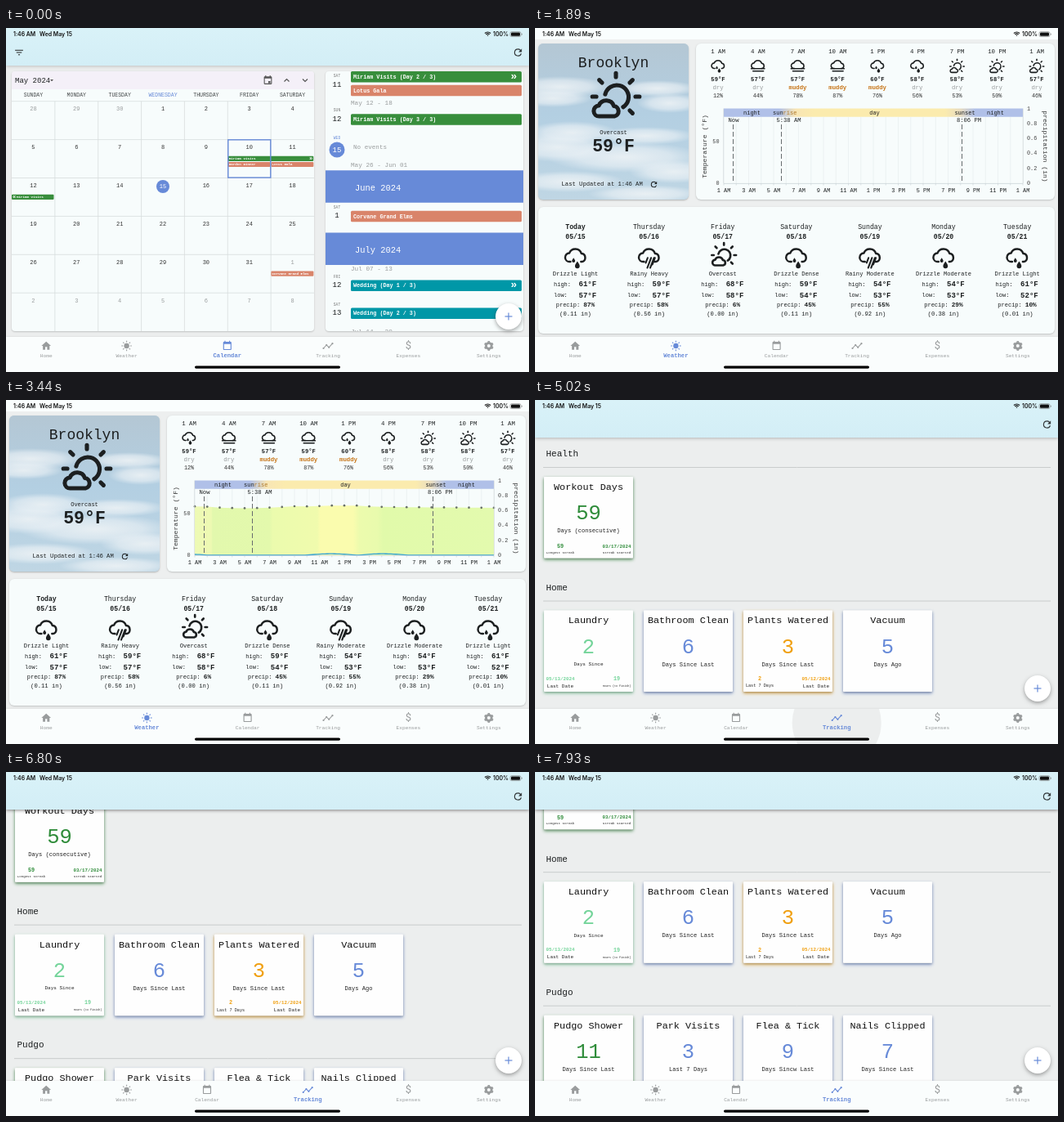
Write an HTML page with a canvas that moves like this. It is 640 by 421 pixels and loops after 8000 ms.

```html
<!DOCTYPE html>
<html lang="en">
<head>
<meta charset="utf-8">
<title>Household planner</title>
<style>
html, body { margin: 0; width: 100%; height: 100%; overflow: hidden; background: #eceeee; }
canvas { display: block; width: 640px; height: 421px; }
</style>
</head>
<body>
<canvas id="stage"></canvas>
<script>
const W = 640, H = 421, LOOP = 8000;
const canvas = document.getElementById('stage');
const c = canvas.getContext('2d');
const dpr = window.devicePixelRatio || 1;
canvas.width = W * dpr;
canvas.height = H * dpr;

const MONO = '"Liberation Mono", monospace';
const BLUE = '#678ad8', GREEN = '#388e3c', ORANGE = '#d9846a', TEAL = '#0097a7';
const INK = '#1c1f20', GRAY = '#999c9d', PAGE = '#eceeee', CARD = '#f7fcfc';

const ICONS = {
  home: 'M10 20v-6h4v6h5v-8h3L12 3 2 12h3v8z',
  calendar: 'M19 3h-1V1h-2v2H8V1H6v2H5c-1.1 0-2 .9-2 2v14c0 1.1.9 2 2 2h14c1.1 0 2-.9 2-2V5c0-1.1-.9-2-2-2zm0 16H5V8h14z',
  refresh: 'M17.65 6.35C16.2 4.9 14.2 4 12 4a8 8 0 1 0 7.73 10h-2.08A6 6 0 1 1 12 6c1.66 0 3.14.69 4.22 1.78L13 11h7V4z',
  filter: 'M10 18h4v-2h-4zM3 6v2h18V6zm3 7h12v-2H6z',
  cloud: 'M7.5 16h-.7a3.9 3.9 0 0 1-.3-7.8A5.8 5.8 0 0 1 17.4 8.6a3.75 3.75 0 0 1 .4 7.4H17',
  closed: 'M6.8 16a3.9 3.9 0 0 1-.3-7.8A5.8 5.8 0 0 1 17.4 8.6a3.75 3.75 0 0 1 .4 7.4z',
  drop: 'M0-2.6C1 -1 1.7-.2 1.7.8a1.7 1.7 0 0 1-3.4 0C-1.7-.2-1-1 0-2.6z'
};
for (const k in ICONS) ICONS[k] = new Path2D(ICONS[k]);

// The picture advances in held steps: [first, last, count].
const STEPS = [[0, 0, 1], [500, 1070, 6], [1270, 1270, 1], [1470, 1570, 2], [1770, 1770, 1],
  [1890, 1890, 1], [2010, 2570, 6], [2670, 3440, 8], [4630, 4630, 1], [4790, 5020, 3],
  [5760, 5760, 1], [6250, 7010, 8], [7110, 7210, 2], [7630, 7930, 4]];
const ticks = STEPS.flatMap(([a, b, n]) =>
  Array.from({ length: n }, (_, i) => n > 1 ? a + (b - a) * i / (n - 1) : a));
const held = t => ticks.filter(k => k <= t).pop();

const clamp = x => Math.max(0, Math.min(1, x));
const ease = x => (1 - Math.cos(Math.PI * clamp(x))) / 2;

function along(points, t) {
  for (let i = 1; i < points.length; i++) {
    const [t0, v0] = points[i - 1], [t1, v1] = points[i];
    if (t <= t1) return v0 + (v1 - v0) * clamp((t - t0) / (t1 - t0));
  }
  return points[points.length - 1][1];
}

function text(s, x, y, size, color = INK, bold = false, align = 'center', font = MONO) {
  c.font = `${bold ? 'bold ' : ''}${size}px ${font}`;
  c.fillStyle = color;
  c.textAlign = align;
  c.fillText(s, x, y + size * 0.3);
}
const left = (s, x, y, size, color, bold) => text(s, x, y, size, color, bold, 'left');

function box(x, y, w, h, color, r = 0) {
  c.fillStyle = color;
  c.beginPath();
  c.roundRect(x, y, w, h, r);
  c.fill();
}
function disc(x, y, r, color) {
  c.fillStyle = color;
  c.beginPath();
  c.arc(x, y, r, 0, 7);
  c.fill();
}
function line(pts, color, width = 1, dash = []) {
  c.strokeStyle = color;
  c.lineWidth = width;
  c.setLineDash(dash);
  c.beginPath();
  pts.forEach(([x, y]) => c.lineTo(x, y));
  c.stroke();
  c.setLineDash([]);
}
function shadowed(color, blur, dy, draw) {
  c.save();
  c.shadowColor = color;
  c.shadowBlur = blur * dpr;
  c.shadowOffsetY = dy * dpr;
  draw();
  c.restore();
}
function at(x, y, scale, draw) {
  c.save();
  c.translate(x, y);
  c.scale(scale, scale);
  draw();
  c.restore();
}
const icon = (name, x, y, size, color) => at(x, y, size / 24, () => {
  c.translate(-12, -12);
  c.fillStyle = color;
  c.fill(ICONS[name], 'evenodd');
});
const card = (x, y, w, h, r = 6) =>
  shadowed('rgba(0,0,0,.22)', 2, .8, () => box(x, y, w, h, CARD, r));

function header(depth) {
  const g = c.createLinearGradient(0, 0, 0, 46);
  g.addColorStop(0, '#d9f2f8');
  g.addColorStop(1, '#d3eef6');
  shadowed(`rgba(0,0,0,${depth})`, 4, 1, () => box(0, 0, W, 46, g));
  icon('refresh', 626.5, 30, 14, '#34393b');
}
function addButton() {
  shadowed('rgba(0,0,0,.35)', 5, 2, () => disc(615, 353, 16, '#fff'));
  line([[610.5, 353], [619.5, 353]], BLUE, 1.2);
  line([[615, 348.5], [615, 357.5]], BLUE, 1.2);
}

function monthGrid() {
  const col = 370 / 7, row = 46.9, x0 = 7, y0 = 89.7;
  card(7, 53, 370, 318, 4);
  box(7, 53, 370, 22, '#f4f0f8', [4, 4, 0, 0]);
  left('May 2024', 11, 64, 9);
  c.fillStyle = '#555';
  c.beginPath();
  c.moveTo(54, 63); c.lineTo(58, 63); c.lineTo(56, 65.3);
  c.fill();
  icon('calendar', 320.5, 64, 13, '#555');
  box(321, 65, 2.6, 2.6, '#555');
  line([[340.5, 65.5], [343.5, 62.5], [346.5, 65.5]], '#555', 1.2);
  line([[363, 62.5], [366, 65.5], [369, 62.5]], '#555', 1.2);

  ['SUNDAY', 'MONDAY', 'TUESDAY', 'WEDNESDAY', 'THURSDAY', 'FRIDAY', 'SATURDAY'].forEach((d, i) =>
    text(d, x0 + col * (i + .5), 82, 6.5, i === 3 ? BLUE : '#454849'));
  for (let r = 0; r < 6; r++) line([[7, y0 + row * r], [377, y0 + row * r]], '#d8dddd', .8);
  for (let i = 1; i < 7; i++) line([[x0 + col * i, y0], [x0 + col * i, 371]], '#d8dddd', .8);
  for (let i = 0; i < 42; i++) {
    const day = new Date(2024, 3, 28 + i), today = i === 17;
    const x = x0 + col * (i % 7 + .5), y = y0 + row * Math.floor(i / 7) + 9.5;
    if (today) disc(x, y + 1, 8, BLUE);
    text(day.getDate(), x, y + (today ? 1 : 0), 7, today ? '#fff' : day.getMonth() === 4 ? '#333' : '#9a9d9e');
  }
  const chip = (s, x, y, w, color) => {
    box(x, y, w, 6.2, color, 1);
    left(s, x + 1, y + 3.1, 4.2, '#fff', true);
  };
  chip('Miriam Visits', 271.8, 156.7, 104.5, GREEN);
  text('»', 373, 159.5, 7, '#fff', true);
  chip('Garden Dinner', 271.8, 163.9, 51.6, ORANGE);
  chip('Lotus Gala', 324.4, 163.9, 52, ORANGE);
  chip('  Miriam Visits', 7, 203.7, 51.5, GREEN);
  text('«', 10, 206.5, 7, '#fff', true);
  chip('Corvane Grand Elms', 324.4, 297.5, 52, ORANGE);
  c.strokeStyle = BLUE;
  c.lineWidth = 1.4;
  c.strokeRect(271.8, 136.8, 52, 46.3);
}

function agenda() {
  card(391, 53, 242, 318, 4);
  c.save();
  c.beginPath();
  c.roundRect(391, 53, 242, 318, 4);
  c.clip();
  const day = (name, n, y) => {
    text(name, 405, y, 4.6, '#777');
    text(n, 405, y + 10, 9);
  };
  const bar = (s, y, color, more) => {
    box(422, y, 209, 13.5, color, 1.5);
    left(s, 425, y + 6.8, 6.75, '#fff', true);
    if (more) text('»', 621.5, y + 6, 13, '#fff', true);
  };
  const range = (s, y) => left(s, 422, y, 7.7, GRAY);
  const month = (s, y) => {
    box(391, y, 242, 39.5, BLUE);
    left(s, 427, y + 21.5, 10.4, '#fff');
  };
  day('SAT', 11, 59);
  bar('Miriam Visits (Day 2 / 3)', 53, GREEN, true);
  bar('Lotus Gala', 69.8, ORANGE);
  range('May 12 - 18', 91.5);
  day('SUN', 12, 101);
  bar('Miriam Visits (Day 3 / 3)', 105.3, GREEN);
  text('WED', 405, 135, 4.6, BLUE);
  disc(405, 149, 9.5, BLUE);
  text(15, 405, 149, 9, '#fff');
  left('No events', 425, 145.5, 7.6, GRAY);
  range('May 26 - Jun 01', 167.5);
  month('June 2024', 174.3);
  day('SAT', 1, 219.5);
  bar('Corvane Grand Elms', 223.7, ORANGE);
  month('July 2024', 250.5);
  range('Jul 07 - 13', 295);
  day('FRI', 12, 304.5);
  bar('Wedding (Day 1 / 3)', 308.5, TEAL, true);
  day('SAT', 13, 338.5);
  bar('Wedding (Day 2 / 3)', 342.5, TEAL, true);
  range('Jul 14 - 20', 371.5);
  c.restore();
}

function calendarScreen() {
  box(0, 0, W, H, PAGE);
  header(.2);
  icon('filter', 16, 30, 13, '#222');
  monthGrid();
  agenda();
  addButton();
}

// Weather glyphs are drawn on a 24-unit square around (x, y).
function weatherIcon(kind, x, y, scale) {
  at(x, y, scale, () => {
    c.lineCap = c.lineJoin = 'round';
    c.strokeStyle = c.fillStyle = INK;
    c.lineWidth = 1.8;
    if (kind === 'sun') {
      c.lineWidth = 2;
      c.beginPath();
      c.arc(.4, .2, 5.7, -2.9, 1);
      c.stroke();
      for (let i = -4; i < 2; i++) {
        const u = Math.cos(i * Math.PI / 4), v = Math.sin(i * Math.PI / 4);
        line([[u * 9.4, v * 9.4], [u * 11.3, v * 11.3]], INK, 2);
      }
      at(-4.4, 5.6, .66, () => {
        c.translate(-12.2, -10.2);
        c.lineWidth = 3;
        c.stroke(ICONS.closed);
      });
      return;
    }
    c.translate(-12, -13);
    c.stroke(ICONS.cloud);
    if (kind === 'drizzle') {
      at(10.3, 14.6, .85, () => c.fill(ICONS.drop));
      at(13.7, 18.8, 1.25, () => c.fill(ICONS.drop));
    } else if (kind === 'rain') {
      [[9, 17], [10.4, 21.5], [13, 21.5], [15, 18.5]].forEach(([px, py], i) =>
        line([[px + (py - 12.5) * .38, 12.5], [px, py]], INK, 1.5));
    } else {
      line([[2.5, 16.3], [21.5, 16.3]], INK, 1.8);
      line([[5, 19.8], [20, 19.8]], INK, 1.8);
    }
  });
}

function skyCard() {
  c.save();
  shadowed('rgba(0,0,0,.25)', 2, 1, () => box(4, 19, 184, 191, '#c0d4e1', 6));
  c.beginPath();
  c.roundRect(4, 19, 184, 191, 6);
  c.clip();
  const sky = c.createLinearGradient(0, 19, 0, 210);
  sky.addColorStop(0, '#b4c7d4');
  sky.addColorStop(.45, '#b3cfe2');
  sky.addColorStop(1, '#bfd6e4');
  box(4, 19, 184, 191, sky);
  [[30, 72, 62, 13], [22, 86, 48, 11], [150, 74, 50, 10], [165, 92, 40, 12], [45, 128, 56, 14],
    [28, 146, 66, 18], [135, 132, 62, 11], [110, 158, 95, 19], [170, 176, 55, 14],
    [40, 188, 70, 13], [135, 203, 70, 11]].forEach(([x, y, rx, ry]) => {
    c.save();
    c.translate(x, y);
    c.scale(rx, ry);
    const puff = c.createRadialGradient(0, 0, 0, 0, 0, 1);
    puff.addColorStop(0, 'rgba(240,244,246,.85)');
    puff.addColorStop(.6, 'rgba(236,242,246,.6)');
    puff.addColorStop(1, 'rgba(232,240,245,0)');
    disc(0, 0, 1, puff);
    c.restore();
  });
  c.restore();
  text('Brooklyn', 96, 43, 18);
  weatherIcon('sun', 99, 84, 2.55);
  text('Overcast', 96, 128, 7);
  text('59°F', 96, 145, 21.5, INK, true);
  left('Last Updated at 1:46 AM', 32.5, 191, 7.2);
  icon('refresh', 145.5, 191.5, 11, INK);
}

const HOURLY = [['1 AM', 'drizzle', 59, 'dry', 12], ['4 AM', 'fog', 57, 'dry', 44],
  ['7 AM', 'fog', 57, 'muddy', 78], ['10 AM', 'fog', 59, 'muddy', 87],
  ['1 PM', 'drizzle', 60, 'muddy', 76], ['4 PM', 'drizzle', 58, 'dry', 56],
  ['7 PM', 'sun', 58, 'dry', 53], ['10 PM', 'sun', 58, 'dry', 50], ['1 AM', 'sun', 57, 'dry', 46]];
const DAILY = [['Today', 'drizzle', 'Drizzle Light', 61, 57, 87, '0.11'],
  ['Thursday', 'rain', 'Rainy Heavy', 59, 57, 58, '0.56'], ['Friday', 'sun', 'Overcast', 68, 58, 6, '0.00'],
  ['Saturday', 'drizzle', 'Drizzle Dense', 59, 54, 45, '0.11'],
  ['Sunday', 'rain', 'Rainy Moderate', 54, 53, 55, '0.92'],
  ['Monday', 'drizzle', 'Drizzle Moderate', 54, 53, 29, '0.38'],
  ['Tuesday', 'drizzle', 'Drizzle Light', 61, 52, 10, '0.01']];
const TEMPS = [59, 58.6, 57.5, 57, 56.8, 57, 57.5, 58.3, 59.2, 59, 59.4, 60, 60, 60, 59, 58.4, 58.2, 58, 58, 57.8, 57.8, 57.6, 57.5, 57.4, 57.3];
const TINTS = [[0, '#eefab5'], [.055, '#edf9b2'], [.06, '#e2f8ad'], [.25, '#e3f9ac'], [.26, '#ebfbad'],
  [.41, '#f0fbad'], [.42, '#fafcae'], [.53, '#fafcae'], [.55, '#ecfbad'], [.61, '#e9fbad'], [.63, '#e1faaa'], [1, '#e3faae']];

function chartSeries(shown) {
  const pts = TEMPS.map((v, i) => [231 + i * 15.25, 189.2 - v]);
  c.save();
  c.beginPath();
  c.rect(228, 90, 371 * shown, 105);
  c.clip();
  const fill = c.createLinearGradient(231, 0, 597, 0);
  TINTS.forEach(([p, color]) => fill.addColorStop(p, color));
  c.fillStyle = fill;
  c.beginPath();
  c.moveTo(231, 190);
  pts.forEach(([x, y]) => c.lineTo(x, y));
  c.lineTo(597, 190);
  c.fill();
  const rain = [];
  const hump = (x, a, b) => x > a && x < b ? Math.sin(Math.PI * (x - a) / (b - a)) : 0;
  for (let x = 231; x <= 597; x += 3)
    rain.push([x, 190 - 1.8 * (hump(x, 366, 430) + hump(x, 430, 492)) - hump(x, 215, 246)]);
  line(rain, '#2f9fd6', 1.3);
  pts.forEach(([x, y]) => disc(x, y, 1.35, '#687068'));
  c.restore();
}

function chart(shown) {
  const band = c.createLinearGradient(231, 0, 597, 0);
  [[0, '#b0c0e8'], [.185, '#b0c0e8'], [.24, '#f8e5b4'], [.3, '#fbebae'], [.74, '#fbebae'],
    [.79, '#e9ddc0'], [.84, '#b0c0e8'], [1, '#b0c0e8']].forEach(s => band.addColorStop(...s));
  for (let i = 0; i <= 24; i++) {
    const x = 231 + i * 15.25;
    line([[x, 109], [x, 190]], '#e9eff0', .8);
    line([[x, 190], [x, 192.5]], '#ccd4d8', .7);
  }
  if (shown > 0) chartSeries(shown);
  box(231, 98.5, 366, 10.3, band);
  text('night', 265.5, 103.5, 7);
  text('sun', 297.3, 103.5, 7);
  text('rise', 312, 103.5, 7, '#b07a2a');
  text('day', 415.5, 103.5, 7);
  text('sunset', 526, 103.5, 7);
  text('night', 563.5, 103.5, 7);
  line([[231, 190.4], [597, 190.4]], '#cdd5da', .8);
  line([[230.6, 98.5], [230.6, 190]], '#d5dbdd', .7);
  line([[597.4, 98.5], [597.4, 190]], '#d5dbdd', .7);
  [['Now', 242.5, 243], ['5:38 AM', 301.5, 310.5], ['8:06 PM', 522.5, 531]].forEach(([s, x, tx]) => {
    line([[x, 109], [x, 190]], '#666c6e', 1, [6, 3]);
    box(tx - s.length * 2.3, 109.3, s.length * 4.6, 7.4, CARD);
    text(s, tx, 113, 7.2);
  });
  for (let i = 0; i < 13; i++) {
    const h = (1 + i * 2) % 24;
    text(`${h % 12 || 12} ${h < 12 ? 'AM' : 'PM'}`, 231 + i * 30.5, 199, 6.9);
  }
  text('50', 225.5, 139, 6.8, '#444', false, 'right');
  text('0', 225.5, 190, 6.8, '#444', false, 'right');
  for (let i = 0; i <= 5; i++) left(String(i / 5), 602, 190 - i * 18.3, 6.8, '#444');
  [['Temperature (°F)', 208, 145, -1], ['precipitation (in)', 624, 145, 1]].forEach(([s, x, y, turn]) => {
    c.save();
    c.translate(x, y);
    c.rotate(turn * Math.PI / 2);
    text(s, 0, 0, 8.1, '#333');
    c.restore();
  });
}

function weatherScreen(t) {
  box(0, 0, W, H, '#edefef');
  box(0, 0, W, 14, '#fafefe');
  skyCard();
  card(197, 19, 439, 191);
  HOURLY.forEach(([hour, kind, temp, ground, wet], i) => {
    const x = 224 + i * 48.75, mud = ground === 'muddy';
    text(hour, x, 29, 7.4);
    weatherIcon(kind, x, 47, kind === 'sun' ? .78 : .86);
    text(temp + '°F', x, 63, 7.2, INK, true);
    text(ground, x, 73, 7.3, mud ? '#c77416' : GRAY, mud);
    text(wet + '%', x, 83, 6.8, '#333');
  });
  chart(ease((t - 1900) / 1540));

  card(4, 219, 632, 155);
  DAILY.forEach(([name, kind, sky, high, low, wet, inches], i) => {
    const x = 49.5 + i * 90.1, sunny = kind === 'sun';
    text(name, x, 244, 8.2, INK, i === 0);
    text(`05/${15 + i}`, x, 256, 8.2, INK, true);
    weatherIcon(kind, x + (sunny ? 1.5 : 0), sunny ? 278 : 282, sunny ? 1.32 : 1.36);
    text(sky, x, 301, 7.1);
    [['high:', high, 313.5], ['low:', low, 327]].forEach(([label, v, y]) => {
      left(label, x - 26.5, y, 7);
      left(v + '°F', x + 4, y, 9, INK, true);
    });
    const num = wet + '%', start = x - (7 * 4.2 + 4 + num.length * 4.7) / 2;
    left('precip:', start, 339, 7);
    left(num, start + 33.4, 339, 7.8, INK, true);
    text(`(${inches} in)`, x, 349.5, 7.2);
  });
}

const LEAF = '#2f8c3a', MINT = '#74d49a', AMBER = '#f0a012';
const GROUPS = [
  ['Health', [['Workout Days', 59, LEAF, 'Days (consecutive)', ['59', 'Longest Streak', 4.1], ['03/17/2024', 'Streak Started', 4.1]]]],
  ['Home', [
    ['Laundry', 2, MINT, 'Days Since', ['05/13/2024', 'Last Date', 6], ['19', 'Hours (to finish)', 3.4]],
    ['Bathroom Clean', 6, BLUE, 'Days Since Last'],
    ['Plants Watered', 3, AMBER, 'Days Since Last', ['2', 'Last 7 Days', 5.2], ['05/12/2024', 'Last Date', 6]],
    ['Vacuum', 5, BLUE, 'Days Ago']]],
  ['Pudgo', [['Pudgo Shower', 11, LEAF, 'Days Since Last'], ['Park Visits', 3, BLUE, 'Last 7 Days'],
    ['Flea & Tick', 9, BLUE, 'Days Sincw Last'], ['Nails Clipped', 7, BLUE, 'Days Since Last']]]
];

function tracker(x, y, [title, count, color, unit, first, second]) {
  shadowed(color + 'a0', 4, 2, () => box(x, y, 109, 99.5, '#fff', 1));
  shadowed('rgba(0,0,0,.25)', 3, 1.5, () => box(x, y, 109, 99.5, '#fefefe', 1));
  const mid = x + 54.5;
  text(title, mid, y + 12.3, 11.8, '#111');
  text(count, mid, y + 44.5, 25.5, color);
  text(unit, mid, y + 66, unit === 'Days Since' ? 6 : 7.1, '#222');
  [[first, x + 20], [second, x + 89]].forEach(([stat, sx]) => {
    if (!stat) return;
    text(stat[0], sx, y + 85 - (color === LEAF ? 0 : 1.5), stat[0].length > 2 ? 5.8 : 6.8, color, true);
    text(stat[1], sx, y + 92.3, stat[2], '#222');
  });
}

const SCROLL = [[6170, 0], [6360, 10.5], [6700, 50], [6900, 69], [7110, 81], [7210, 82], [7530, 82],
  [7730, 106], [7930, 123.3]];

function trackingScreen(t) {
  const scroll = along(SCROLL, t);
  box(0, 0, W, H, PAGE);
  GROUPS.forEach(([name, cards], i) => {
    const y = 66 + i * 163.5 - scroll;
    left(name, 13.5, y, 11);
    line([[10, y + 16.5], [631, y + 16.5]], '#c9cccc', 1);
    cards.forEach((item, k) => tracker(11 + k * 122, y + 28, item));
  });
  header(scroll > 0 ? .45 : .25);
  addButton();
}

function statusBar() {
  [['1:46 AM', 9], ['Wed May 15', 41], ['100%', 596]].forEach(([s, x]) => {
    c.font = '600 6.9px Inter, sans-serif';
    c.textAlign = 'left';
    c.fillStyle = '#111';
    c.fillText(s, x, 10);
  });
  for (const r of [1, 3, 5]) {
    c.beginPath();
    c.arc(589.5, 10, r, -Math.PI * .75, -Math.PI * .25);
    c.strokeStyle = '#111';
    c.lineWidth = 1.2;
    c.stroke();
  }
  c.lineWidth = .6;
  c.strokeStyle = '#777';
  c.beginPath();
  c.roundRect(617, 4.6, 13, 6, 1.8);
  c.stroke();
  box(618, 5.5, 11, 4.2, '#111', 1);
  box(630.8, 6.6, .8, 2, '#777', .4);
}

const TAB_ICONS = {
  Home: col => icon('home', 0, 0, 14, col),
  Weather: col => {
    disc(0, 0, 3.2, col);
    for (let i = 0; i < 8; i++) {
      const u = Math.cos(i * Math.PI / 4), v = Math.sin(i * Math.PI / 4);
      line([[u * 4.5, v * 4.5], [u * 6.2, v * 6.2]], col, 1.1);
    }
  },
  Calendar: col => icon('calendar', 0, 0, 13.5, col),
  Tracking: col => {
    const pts = [[-5.5, 3], [-1.8, -1], [1.2, 1.8], [5.5, -2.8]];
    line(pts, col, 1.1);
    pts.forEach(([x, y]) => disc(x, y, 1.1, col));
  },
  Expenses: col => text('$', 0, 0, 13, col, false, 'center', 'Roboto, sans-serif'),
  Settings: col => {
    c.strokeStyle = col;
    c.lineWidth = 2.8;
    c.beginPath();
    c.arc(0, 0, 3.4, 0, 7);
    c.stroke();
    for (let i = 0; i < 6; i++) {
      const a = Math.PI / 6 + i * Math.PI / 3, u = Math.cos(a), v = Math.sin(a);
      line([[u * 4, v * 4], [u * 5.9, v * 5.9]], col, 2.6);
    }
  }
};

function tabBar(from, to, p, ripple) {
  shadowed('rgba(0,0,0,.12)', 2, -.5, () => box(0, 378, W, 43, '#fafdfd'));
  const share = i => (i === from ? 1 - p : 0) + (i === to ? p : 0);
  let x = 0;
  Object.entries(TAB_ICONS).forEach(([name, draw], i) => {
    const on = share(i), w = 98.4 + 49.6 * on, mid = x + w / 2;
    const col = on > .5 ? BLUE : GRAY;
    if (i === to && ripple > 0) {
      c.save();
      c.beginPath();
      c.rect(0, 378, W, 43);
      c.clip();
      disc(mid, 395, 54.5 * ripple, '#eceeee');
      c.restore();
    }
    at(mid, 389, 1, () => draw(col));
    text(name, mid, 401 - .6 * on, 6.2 + on, col, on > .5);
    x += w;
  });
  box(231, 413.5, 178, 3.2, '#000', 1.6);
}

function draw(t) {
  c.setTransform(dpr, 0, 0, dpr, 0, 0);
  c.globalAlpha = 1;
  const screens = { 1: weatherScreen, 2: calendarScreen, 3: trackingScreen };
  const second = t >= 4790;
  const [from, to] = second ? [1, 3] : [2, 1];
  const p = ease(second ? (t - 4700) / 320 : (t - 430) / 400);
  const tapped = second ? t < 5760 : t >= 500 && t < 1070;
  if (p < 1) screens[from](t);
  c.globalAlpha = p;
  if (p > 0) screens[to](t);
  c.globalAlpha = 1;
  tabBar(from, to, p, tapped ? p : 0);
  statusBar();
}

let last = -1;
const start = performance.now();
function tick() {
  const t = held((performance.now() - start) % LOOP);
  if (t !== last) draw(last = t);
  requestAnimationFrame(tick);
}
tick();
</script>
</body>
</html>
```
